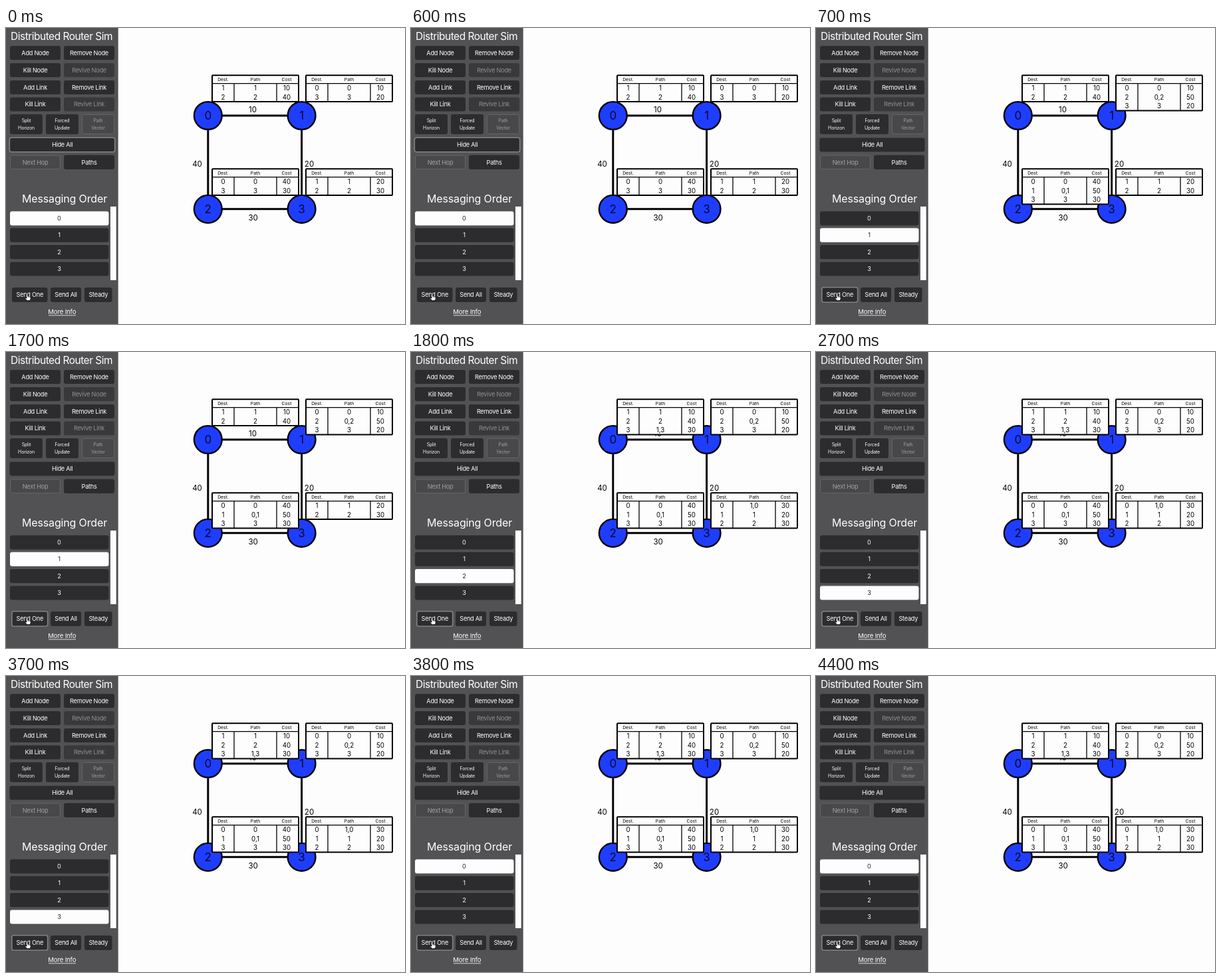
Animation of 600x446 px, one loop 4500 ms. Source, as an HTML page with a canvas:

```html
<!DOCTYPE html>
<html lang="en">
<head>
<meta charset="utf-8">
<title>Distributed Router Sim</title>
<style>
  html, body { margin: 0; width: 100%; height: 100%; overflow: hidden; background: #fefdfe; }
  canvas { display: block; width: 600px; height: 446px; }
</style>
</head>
<body>
<canvas id="stage"></canvas>
<script>
const W = 600, H = 446, LOOP = 4500;
const canvas = document.getElementById('stage');
const ctx = canvas.getContext('2d');
const ratio = window.devicePixelRatio || 1;
canvas.width = W * ratio;
canvas.height = H * ratio;

const FONT = 'Inter, Roboto, sans-serif';
const DARK = '#2c2b2d', PAPER = '#fefdfe', INK = '#000';

// Times at which a node's update is delivered
const SENDS = [700, 1800, 2700, 3800];

const NODES = [[303.8, 132], [444.6, 132], [303.8, 272.8], [444.6, 272.8]];
const LINKS = [[0, 1], [0, 2], [1, 3], [2, 3]];
const COSTS = [['10', 371, 123], ['40', 287.5, 204.5], ['20', 456, 204.5], ['30', 371.7, 286]];

// Rows: destination, path, cost, number of sends needed before the row exists
const TABLES = [
  { x: 310, y: 71.3, rows: [['1', '1', '10', 0], ['2', '2', '40', 0], ['3', '1,3', '30', 2]] },
  { x: 451, y: 71.3, rows: [['0', '0', '10', 0], ['2', '0,2', '50', 1], ['3', '3', '20', 0]] },
  { x: 310, y: 212.3, rows: [['0', '0', '40', 0], ['1', '0,1', '50', 1], ['3', '3', '30', 0]] },
  { x: 451, y: 212.3, rows: [['0', '1,0', '30', 2], ['1', '1', '20', 0], ['2', '2', '30', 0]] }
];

function text(str, x, y, size, color, spacing = 0) {
  ctx.font = `400 ${size}px ${FONT}`;
  ctx.letterSpacing = spacing + 'px';
  ctx.textAlign = 'center';
  ctx.textBaseline = 'alphabetic';
  ctx.fillStyle = color;
  ctx.fillText(str, x, y + size * 0.364);
}

function box(x, y, w, h, fill, border, line = 1) {
  ctx.beginPath();
  ctx.roundRect(x, y, w, h, 3);
  ctx.fillStyle = fill;
  ctx.fill();
  if (border) {
    ctx.strokeStyle = border;
    ctx.lineWidth = line;
    ctx.stroke();
  }
}

function line(x1, y1, x2, y2, width) {
  ctx.beginPath();
  ctx.moveTo(x1, y1);
  ctx.lineTo(x2, y2);
  ctx.strokeStyle = INK;
  ctx.lineWidth = width;
  ctx.stroke();
}

// Each look: fill, border, text colour, border inset, border width
const LOOKS = {
  on: [DARK, null, '#fff', 0, 0],
  dim: ['#39383a', null, '#8f8e90', 0, 0],
  used: ['#48474a', '#656466', '#a09fa1', 0.5, 1],
  focus: [DARK, '#828183', '#fff', -0.2, 1.6]
};

function button(label, x, y, w, h, look = 'on') {
  const [fill, border, color, inset, width] = LOOKS[look];
  box(x + inset, y + inset, w - 2 * inset, h - 2 * inset, fill, border, width);
  const lines = label.split('\n');
  const [size, spacing] = lines.length > 1 ? [6.9, -0.1] : [9.2, -0.28];
  lines.forEach((s, i) => {
    const dy = (i - (lines.length - 1) / 2) * 11;
    text(s, x + w / 2, y + h / 2 + dy, size, color, spacing);
  });
}

function hand(x, y) {
  ctx.save();
  ctx.translate(x, y);
  ctx.beginPath();
  ctx.moveTo(-2.8, -3.8);
  ctx.quadraticCurveTo(-1.7, -5.3, -0.8, -3.6);
  ctx.lineTo(0.2, -0.9);
  ctx.lineTo(2.8, -1);
  ctx.quadraticCurveTo(4.4, -0.6, 4.2, 1.7);
  ctx.lineTo(3.2, 4.6);
  ctx.lineTo(-1, 4.8);
  ctx.lineTo(-4, 1.7);
  ctx.quadraticCurveTo(-3.8, 0.2, -1.7, 1);
  ctx.closePath();
  ctx.fillStyle = '#fff';
  ctx.fill();
  ctx.strokeStyle = INK;
  ctx.lineWidth = 0.7;
  ctx.stroke();
  ctx.restore();
}

function panel(sent) {
  ctx.fillStyle = '#525153';
  ctx.fillRect(0, 0, 168.7, H);
  text('Distributed Router Sim', 83.6, 12.8, 15.5, '#fff', -0.5);

  button('Add Node', 6, 27, 76, 21);
  button('Remove Node', 87, 27, 76, 21);
  button('Kill Node', 6, 53, 76, 21);
  button('Revive Node', 87, 53, 76, 21, 'dim');
  button('Add Link', 6, 79, 76, 21);
  button('Remove Link', 87, 79, 76, 21);
  button('Kill Link', 6, 104.5, 76, 21);
  button('Revive Link', 87, 104.5, 76, 21, 'dim');
  button('Split\nHorizon', 6, 130, 49, 30);
  button('Forced\nUpdate', 60, 130, 49, 30);
  button('Path\nVector', 114, 130, 49, 30, 'used');
  button('Hide All', 5.5, 165.5, 158, 21, sent ? 'on' : 'focus');
  button('Next Hop', 6, 191.5, 76, 21.5, 'used');
  button('Paths', 87, 191.5, 76, 21.5);

  text('Messaging Order', 88, 257.5, 16, '#fff', -0.15);
  for (let i = 0; i < 4; i++) {
    const y = 276.2 + i * 25.4, active = i === sent % 4;
    box(6, y, 148.5, 21.2, active ? PAPER : DARK);
    text(String(i), 80, y + 10.4, 9.2, active ? '#222' : '#fff');
  }
  ctx.fillStyle = PAPER;
  ctx.fillRect(157, 269, 8.7, 111);

  button('Send One', 9, 391, 53.5, 22, sent ? 'focus' : 'on');
  button('Send All', 67, 391, 46, 22);
  button('Steady', 118, 391, 41.5, 22);
  text('More Info', 84.3, 428, 9.6, '#fff', -0.15);
  ctx.fillStyle = '#fff';
  ctx.fillRect(64, 432.6, 41, 0.8);
  hand(33, 406);
}

function table({ x, y, rows }, sent) {
  const shown = rows.filter(r => r[3] <= sent);
  const w = 130, h = 13 + shown.length * 13.4;
  const cols = [16.5, 65, 112];
  ctx.fillStyle = PAPER;
  ctx.strokeStyle = INK;
  ctx.lineWidth = 2;
  ctx.beginPath();
  ctx.roundRect(x, y, w, h, 1);
  ctx.fill();
  ctx.stroke();
  line(x, y + 12.3, x + w, y + 12.3, 1.3);
  line(x + 33, y + 12.3, x + 33, y + h, 1.3);
  line(x + 97, y + 12.3, x + 97, y + h, 1.3);
  ['Dest.', 'Path', 'Cost'].forEach((s, i) => text(s, x + cols[i], y + 5.8, 6.8, INK));
  shown.forEach((r, n) =>
    cols.forEach((c, i) => text(r[i], x + c, y + 19.2 + n * 13.5, 9.7, INK)));
}

function network(sent) {
  for (const [a, b] of LINKS) line(...NODES[a], ...NODES[b], 3);
  for (const [s, x, y] of COSTS) text(s, x, y, 11.5, INK);
  NODES.forEach(([x, y], i) => {
    ctx.beginPath();
    ctx.arc(x, y, 20.9, 0, Math.PI * 2);
    ctx.fillStyle = '#1f3dff';
    ctx.fill();
    ctx.strokeStyle = INK;
    ctx.lineWidth = 2.4;
    ctx.stroke();
    text(String(i), x, y, 17, '#080a24');
  });
  TABLES.forEach(t => table(t, sent));
}

function draw(t) {
  const sent = SENDS.filter(s => t >= s).length;
  ctx.setTransform(ratio, 0, 0, ratio, 0, 0);
  ctx.fillStyle = PAPER;
  ctx.fillRect(0, 0, W, H);
  network(sent);
  panel(sent);
}

const start = performance.now();
function tick() {
  draw((performance.now() - start) % LOOP);
  requestAnimationFrame(tick);
}
tick();
</script>
</body>
</html>
```
